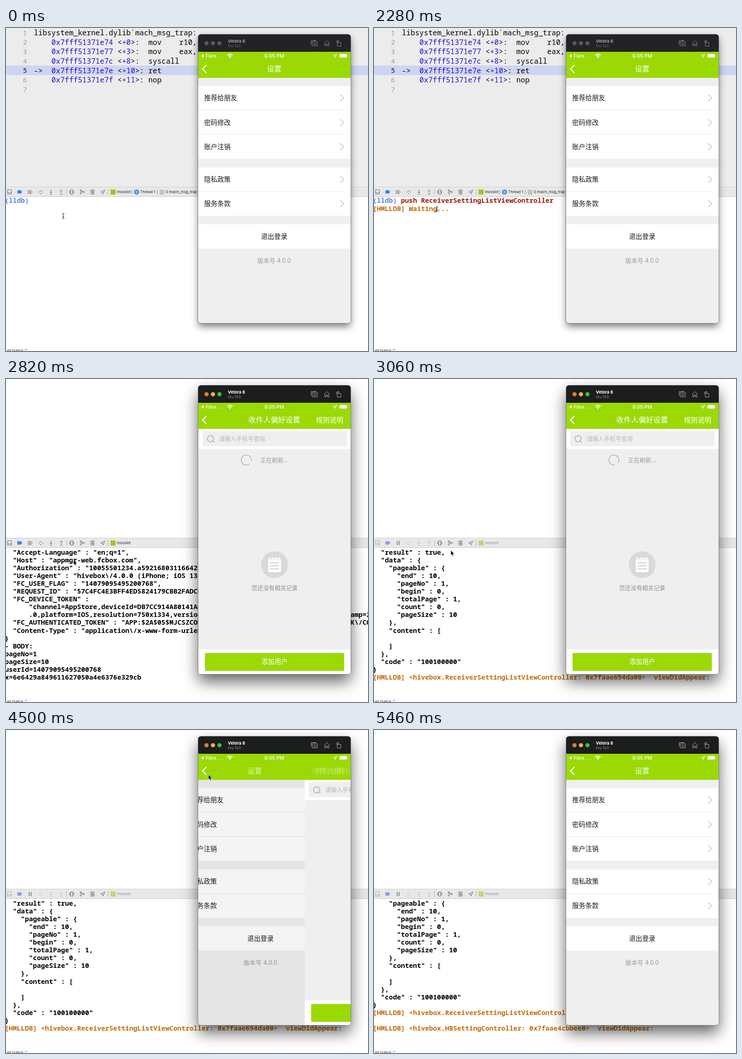
Animation of 793x706 px, one loop 5.76 s. Source, as an HTML page:

```html
<!DOCTYPE html>
<html lang="zh">
<head>
<meta charset="utf-8">
<style>
html, body { margin: 0; width: 100%; height: 100%; overflow: hidden; background: #fff; }
svg { display: block; }
text { white-space: pre; }
.ui { font-family: Inter, "Noto Sans CJK SC", "Noto Sans CJK", sans-serif; }
.mono { font-family: "Noto Sans Mono", "Noto Sans CJK SC", "Noto Sans CJK", monospace; }
</style>
</head>
<body>
<svg id="stage" width="793" height="706" viewBox="0 0 793 706"></svg>
<script>
const stage = document.getElementById('stage');
const LOOP = 5760, STEP = 60;
const PUSH = 2400, FOCUS = 2760, REPLY = 3060, POP = 4374, BACK_LOG = 4920;
const GREEN = '#9bd905', RED = '#a01505', BLUE = '#4f86f0', ORANGE = '#c06c0c';

const clamp = v => Math.max(0, Math.min(1, v));
const ease = (t, a, b) => { const k = clamp((t - a) / (b - a)); return k * k * (3 - 2 * k); };
const mix = (a, b, k) => a + (b - a) * k;
const springLeft = ms => { const w = Math.max(0, ms) * .0194; return (1 + w) * Math.exp(-w); };

const esc = s => s.replace(/&/g, '&amp;').replace(/</g, '&lt;');
const rect = (x, y, w, h, fill, more = '') =>
  `<rect x="${x}" y="${y}" width="${w}" height="${h}" fill="${fill}" ${more}/>`;
const disc = (x, y, r, fill) => `<circle cx="${x}" cy="${y}" r="${r}" fill="${fill}"/>`;
const line = (d, color, width = 1, more = '') =>
  `<path d="${d}" fill="none" stroke="${color}" stroke-width="${width}" ${more}/>`;
const shape = (d, fill, more = '') => `<path d="${d}" fill="${fill}" ${more}/>`;
const group = (x, y, body, more = '') => `<g transform="translate(${x} ${y})" ${more}>${body}</g>`;
const ui = (x, y, s, size, fill, more = '') =>
  `<text class="ui" x="${x}" y="${y}" font-size="${size}" fill="${fill}" ${more}>${esc(s)}</text>`;
const mid = (y, s, size, fill, more = '') =>
  ui(587.5, y, s, size, fill, 'text-anchor="middle" ' + more);
const log = (y, s, fill = '#000', col = 0, weight = 700) =>
  `<text class="mono" x="${-2.6 + col * 8.8}" y="${y}" font-size="14.66" font-weight="${weight}" fill="${fill}">${esc(s)}</text>`;

// ---- editor ----
const CODE = [
  'libsystem_kernel.dylib`mach_msg_trap:',
  '    0x7fff51371e74 <+0>:  mov    r10, rcx',
  '    0x7fff51371e77 <+3>:  mov    eax, 0x100001f',
  '    0x7fff51371e7c <+8>:  syscall',
  '->  0x7fff51371e7e <+10>: ret',
  '    0x7fff51371e7f <+11>: nop',
  ''];

function editor() {
  const rows = CODE.map((s, i) => {
    const y = 15.9 + 20.65 * i;
    const code = esc(s).replace(/0x\w+|\+\d+/g, '<tspan fill="#1c14cf">$&</tspan>');
    return `<text class="mono" x="46" y="${y - .3}" font-size="14.6" text-anchor="end" fill="${i == 4 ? '#111' : '#9a9a9a'}">${i + 1}</text>
      <text class="mono" x="61" y="${y}" font-size="16.08" fill="#000">${code}</text>`;
  });
  return rect(0, 0, 793, 348, '#ececec') + rect(0, 82, 793, 21, '#ced4f2') + rows.join('');
}

// ---- debug bar ----
function debugBar(t) {
  const idle = t >= REPLY - STEP, c = '#666', dim = idle ? '#bdbdbd' : c;
  let s = rect(0, 347, 793, 22, '#e8e8e8') + rect(0, 347, 793, 1, '#cfcfcf') + rect(0, 368, 793, 1, '#c8c8c8');
  s += line('M3.5 353.500h8.500v9.500h-8.500zM3.500 360h8.500', idle ? '#aaa' : c);
  s += shape('M25 354.500h7.500l3 3.750-3 3.750h-7.500z', idle ? '#8b9fea' : '#3f83f5');
  s += idle ? line('M51 354v9M55 354v9', '#777', 1.6)
            : line('M48.500 354v9M51.500 354v9M53.500 354.500l4.500 4-4.500 4z', c);
  s += line('M71 360l5-5 5 5M74 362h4M98.500 353v8M95.500 358l3 3 3-3M96 363.500h5M121 362v-8M118 357l3-3 3 3M118.500 363.500h5', dim);
  s += line('M132.500 352v12M223.500 352v12', '#aaa');
  s += line('M141.500 354h5v9h-5zM139.500 356v5M148.500 356v5', c, 1.2);
  s += line('M165 356l5 2.500M165 356v4M167 358.500h3', c) + [[164, 355], [164, 361.5], [170.5, 358.5]].map(p =>
    `<circle cx="${p[0]}" cy="${p[1]}" r="1.600" fill="#e8e8e8" stroke="${c}"/>`).join('');
  s += line('M186 354h7v3.500h-7zM186 359.500h7v3.500h-7zM189 354v3.500M190 359.500v3.500', c);
  s += line('M207.500 358.500l9-4.500-4 9-1-4z', c);
  s += rect(229, 353, 11, 11, '#9cc81e', `opacity="${idle ? .55 : 1}"`);
  s += ui(243, 361.3, 'mosslot', 8.1, idle ? '#8a8a8a' : '#222');
  if (t < FOCUS) {
    s += line('M274 354l3 4.500-3 4.500M330 354l3 4.500-3 4.500', '#777');
    s += disc(286, 358.5, 5.5, '#4a80e8') + line('M284.800 355.500v6M287.200 355.500v6', '#fff');
    s += ui(294, 361.3, 'Thread 1', 8.1, '#222') + rect(337, 354, 9.5, 9.5, '#aaa', 'rx="1.500"') +
      line('M339.500 356.500h4.500v4.500h-4.500z', '#fff');
    s += ui(350, 361.3, '0 mach_msg_trap', 8.2, '#222');
  }
  return s;
}

// ---- console ----
const REQUEST = `  "Accept-Language" : "en;q=1",
  "Host" : "appmgr-web.fcbox.com",
  "Authorization" : "10055501234.a592168031166427",
  "User-Agent" : "hivebox\\/4.0.0 (iPhone; iOS 13.0",
  "FC_USER_FLAG" : "14079095495200768",
  "REQUEST_ID" : "57C4FC4E3BFF4ED5824179CBB2FADC0",
  "FC_DEVICE_TOKEN" :
      "channel=AppStore,deviceId=DB7CC914A80141A0
      .0,platform=IOS,resolution=750x1334,version
  "FC_AUTHENTICATED_TOKEN" : "APP:$2A$05$MJCSZCOU
  "Content-Type" : "application\\/x-www-form-urlen
}
- BODY:
pageNo=1
pageSize=10
userId=14079095495200768
x=6e6429a849611627050a4e6376e329cb`.split('\n');

const RESPONSE = `  "result" : true,
  "data" : {
    "pageable" : {
      "end" : 10,
      "pageNo" : 1,
      "begin" : 0,
      "totalPage" : 1,
      "count" : 0,
      "pageSize" : 10
    },
    "content" : [

    ]
  },
  "code" : "100100000"
}
[HMLLDB] <hivebox.ReceiverSettingListViewController: 0x7faae694da00>  viewDidAppear:

[HMLLDB] <hivebox.HBSettingController: 0x7faae4cbbee0>  viewDidAppear:`.split('\n');

const page = rows => rows.map((s, i) => {
  const note = s.startsWith('[HM');
  return log(383.8 + 17.07 * i, s, note ? ORANGE : '#000', 0, note ? 600 : 700);
}).join('');

const KEYS = [480, 600, 840, 960, 1080];

function consoleText(t) {
  if (t >= BACK_LOG) return page(RESPONSE.slice(2));
  if (t >= REPLY) return page(RESPONSE.slice(0, 17));
  if (t >= FOCUS) return page(REQUEST) + log(520.4, 'amp=2', '#000', 86.05) + log(537.4, 'K\\/CO', '#000', 86.05);
  let typed = 'push '.slice(0, KEYS.filter(k => t >= k).length);
  if (t >= 1440) typed += 'ReceiverSettingListViewController';
  const caret = (x, y) => rect(x, y, 1, 17, '#333');
  let s = log(382.3, '(lldb)', BLUE) + log(382.3, typed, RED, 7);
  if (t >= 420 && t < 1740) s += caret(59 + typed.length * 8.8, 369);
  if (t >= 1740) s += log(399.6, '[HMLLDB] Waiting...', ORANGE, 0, 600);
  if (t >= PUSH) s += log(416.6, '[HMLLDB] push succeed', ORANGE, 0, 600) +
    log(433.8, 'Process 28813 resuming', ORANGE, 0, 600) + log(453, '上报位置.') +
    log(471, '(lldb)', RED) + caret(59.5, 458);
  return s;
}

// ---- phone ----
function settingsPage() {
  const sep = y => rect(421, y, 320, 1, '#e6e6e6');
  const row = (y, s) => ui(434, y + 5.4, s, 14.5, '#1c1c1c') + line(`M732 ${y - 7.5}l8 7.500-8 7.500`, '#cfcfcf', 1.8);
  return rect(421, 109, 334, 536, '#efefef') +
    rect(421, 127, 334, 159, '#fff') + rect(421, 305, 334, 105.5, '#fff') + rect(421, 429, 334, 53, '#fff') +
    [179, 232, 357].map(sep).join('') +
    row(153, '推荐给朋友') + row(206.5, '密码修改') + row(259.5, '账户注销') + row(331, '隐私政策') + row(384, '服务条款') +
    mid(460.6, '退出登录', 14.4, '#1c1c1c') + mid(513.4, '版本号 4.0.0', 13, '#999');
}

function receiverPage(t) {
  const up = ease(t, REPLY + STEP, 3540);
  let s = rect(421, 109, 334, 536, '#efefef') + rect(421, 109, 334, 44, '#fff') +
    rect(430, 114, 316, 33, '#efefef', 'rx="2"') +
    `<circle cx="447" cy="130.500" r="6.800" fill="none" stroke="#a8a8a8" stroke-width="1.500"/>` +
    line('M452 135.500l3.500 3.500', '#a8a8a8', 1.6) + ui(466, 135.3, '请输入手机号查询', 12.6, '#b6b6b6');
  if (up < 1) s += `<g opacity="${1 - up}">` +
    group(525.5, 177 - 48 * up, line('M8.400 7.100A11 11 0 1 1 11 0', '#999', 1.1, `transform="rotate(${(t - 2700) * .1})"`)) +
    ui(556.5, 181.8 - 48 * up, '正在刷新...', 12.6, '#999', 'font-weight="500"') + '</g>';
  if (t >= FOCUS) s += group(0, -48 * up,
    disc(587.5, 406, 29.3, '#d9d9d9') + rect(573.5, 392, 28, 30, '#fff', 'rx="1.500"') +
    [0, 1, 2, 3].map(i => rect(575 + i * 7, 389, 4, 7, '#fff', 'rx="2" stroke="#d9d9d9"')).join('') +
    line('M578 402h19M578 408.500h19M578 415h19', '#d4d4d4', 2.4) +
    mid(461, '您还没有相关记录', 12.6, '#8e8e8e'));
  return s + rect(421, 591, 334, 54, '#fff') + rect(435, 599, 305, 39, GREEN, 'rx="2"') +
    mid(623, '添加用户', 14.3, '#fff', 'font-weight="500"');
}

function navBar(left) {
  let s = rect(421, 52, 334, 57, GREEN);
  s += shape('M427 61l6-3.500v7z', '#fff') + ui(437.5, 64.6, 'Files', 10.5, '#fff', 'font-weight="500"') +
    ui(465, 64.6, '....', 10.5, '#fff', 'opacity=".6"');
  s += line('M484.500 59.500q6-5 12 0M487 62q3.500-3 7 0', '#fff', 1.7) + shape('M490.500 66l-2-2.200q2-1.500 4 0z', '#fff');
  s += mid(64.8, '6:05 PM', 10.8, '#fff', 'font-weight="500"');
  s += line('M717 61l7.500-4-3.500 7.500-.600-3.500z', '#fff') + rect(730.5, 57, 16, 7.5, '#fff', 'rx="1.800"') + rect(747, 59.3, 1, 3, '#fff');
  s += line('M439 81l-8.500 8.500 8.500 8.500', '#fff', 2.4);
  s += group(-143 * (1 - left), 0, mid(95, '设置', 15.8, '#fff'), `opacity="${left}"`);
  return s + group(210 * left ** 1.15, 0, mid(95, '收件人偏好设置', 16.2, '#fff'), `opacity="${1 - left}"`) +
    ui(678.8, 94.7, '规则说明', 15.1, '#fff', `opacity="${1 - left}"`);
}

function titleBar(active) {
  const dots = active ? ['#d8803a', '#eeb03c', '#2fc544'] : ['#57585a', '#57585a', '#57585a'];
  const c = active ? '#b0b0b0' : '#8f8f90';
  return rect(421, 14, 334, 38, active ? '#1c1d1f' : '#222326') +
    dots.map((d, i) => disc(439.2 + 14.2 * i, 33.3, 4.6, d)).join('') +
    ui(486, 32, 'Velora 8', 9.4, active ? '#fff' : '#a4a4a5', 'font-weight="700"') +
    ui(486, 41.8, 'Oru 13.0', 7.3, active ? '#a8a8a8' : '#777') +
    line('M668.500 36v-8.500h11M671 30h3l1-1.500h3l1 1.500h3v9h-11z', c) +
    `<circle cx="676.500" cy="34.500" r="2.300" fill="none" stroke="${c}"/>` +
    line('M697 33.500l6-6 6 6M698.500 33v6h3v-4h3v4h3v-6', c) +
    line('M726 31.500h7.500v8h-7.500zM724 33v-4.500h5M727 26.500l2 2-2 2', c);
}

function phone(t) {
  const active = t >= FOCUS;
  const left = t < POP ? springLeft(t - PUSH) : 1 - springLeft(t - POP);
  const blur = active ? [17, 16, .62] : [8, 8, .5];
  let s = rect(421, 14 + blur[1], 334, 631, '#000', `rx="6" opacity="${blur[2]}" style="filter:blur(${blur[0]}px)"`);
  s += rect(420.5, 13.5, 335, 632, '#555', 'rx="6.500"');
  s += '<clipPath id="body"><rect x="421" y="14" width="334" height="631" rx="6"/></clipPath><g clip-path="url(#body)">';
  s += group(-100 * (1 - left), 0, settingsPage());
  if (left < 1) s += rect(421, 109, 334, 536, '#000', `opacity="${.15 * (1 - left)}"`) + group(333 * left, 0, receiverPage(t));
  return s + navBar(left) + titleBar(active) + '</g>';
}

// ---- pointer ----
const beam = (x, y) => group(x, y, line('M-2.500-5.500q2.500 0 2.500 1.500v8q0 1.500-2.500 1.500M2.500-5.500q-2.500 0-2.500 1.500M0 4q0 1.500 2.500 1.500M-1.500 1.500h3', '#222'));
const arrow = (x, y) => group(x, y, shape('M0 0v11l2.500-2.300 1.700 4 1.900-.800-1.700-3.900h3.400z', '#000', 'stroke="#fff" stroke-width=".700"'));

function pointer(t) {
  if (t < 420) return beam(125.5, 411);
  if (t < 2040 || t >= 5460) return '';
  if (t < FOCUS) { const k = ease(t, 2040, 2280); return beam(mix(134, 138, k), mix(400, 396, k)); }
  const k = ease(t, 2940, 3690), out = ease(t, 4920, 5460);
  return arrow(mix(mix(148, 443.5, k), 250, out), mix(mix(395.5, 89, k) + 8.5 * ease(t, 3840, 4080), 340, out));
}

function scene(t) {
  return rect(0, 0, 793, 706, '#fff') + (t < FOCUS ? editor() : '') + consoleText(t) + debugBar(t) +
    ui(2, 707.6, 'All Output', 7.6, '#222') + line('M42 703.500l2-2 2 2M42 705.500l2 2 2-2', '#333') +
    phone(t) + pointer(t);
}

let shown = -1;
function tick(now) {
  const t = Math.floor(now % LOOP / STEP) * STEP;
  if (t !== shown) stage.innerHTML = scene(shown = t);
  requestAnimationFrame(tick);
}
tick(0);
</script>
</body>
</html>
```
